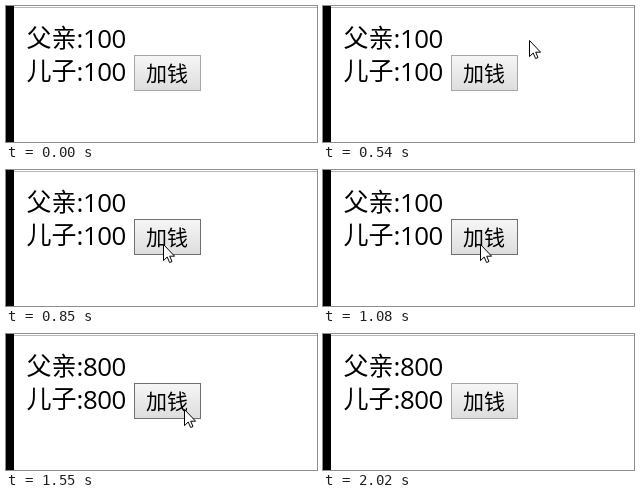
An HTML page for the animation above (2550 ms loop, 311x136 px).

```html
<!DOCTYPE html>
<html lang="zh-CN">
<head>
<meta charset="utf-8">
<title>加钱</title>
<style>
html, body { margin: 0; width: 100%; height: 100%; overflow: hidden; background: #fff; }
svg { display: block; width: 311px; height: 136px; }
text { fill: #000; font-family: "Noto Sans CJK SC", "Noto Sans CJK", sans-serif; font-size: 25px; }
.num { font-family: "Open Sans", "Noto Sans", sans-serif; font-size: 25.8px; letter-spacing: -.5px; }
.label { font-size: 21px; }
.before, .after, .hover, .cursor { animation: 2550ms step-end infinite; }
.before { animation-name: before; }
.after { animation-name: after; }
.hover { animation-name: hover; }
.cursor { animation-name: move; }

@keyframes before { 0% { opacity: 1 } 45.88%, 100% { opacity: 0 } }
@keyframes after { 0% { opacity: 0 } 45.88%, 100% { opacity: 1 } }
@keyframes hover { 0% { opacity: 0 } 27.45% { opacity: 1 } 63.92%, 100% { opacity: 0 } }

/* enter from below, curve up, come down on the button, click, leave */
@keyframes move {
  0% { transform: translate(0, 200px) }
  2.74% { transform: translate(255px, 124px) }
  5.88% { transform: translate(253px, 96px) }
  9.41% { transform: translate(247px, 71px) }
  12.54% { transform: translate(236px, 56px) }
  15.29% { transform: translate(224px, 46px) }
  18.03% { transform: translate(213px, 38px) }
  21.17% { transform: translate(206px, 34px) }
  24.31% { transform: translate(200px, 41px) }
  27.45% { transform: translate(183px, 57px) }
  30.19% { transform: translate(166px, 69px) }
  33.33% { transform: translate(157px, 74px) }
  60.78% { transform: translate(178px, 75px) }
  63.92% { transform: translate(207px, 78px) }
  67.05% { transform: translate(232px, 83px) }
  70.19% { transform: translate(256px, 94px) }
  72.94% { transform: translate(277px, 108px) }
  76.07% { transform: translate(293px, 125px) }
  79.21%, 100% { transform: translate(0, 200px) }
}
</style>
</head>
<body>
<svg viewBox="0 0 311 136">
  <defs>
    <linearGradient id="face" x2="0" y2="1">
      <stop stop-color="#f6f6f6"/><stop offset="1" stop-color="#dddddd"/>
    </linearGradient>
  </defs>
  <rect width="311" height="136" fill="#fff"/>
  <rect x="8" y="1" width="303" height="1" fill="#b6b6b6"/>
  <rect width="8" height="136" fill="#000"/>

  <text x="20.5" y="41">父亲</text>
  <text x="20.5" y="74">儿子</text>
  <text class="num" x="70.5" y="42">:</text>
  <text class="num" x="70.5" y="75">:</text>
  <g class="before">
    <text class="num" x="77" y="42">100</text>
    <text class="num" x="77" y="75">100</text>
  </g>
  <g class="after">
    <text class="num" x="77" y="42">800</text>
    <text class="num" x="77" y="75">800</text>
  </g>

  <rect x="128.5" y="49.5" width="66" height="35" fill="url(#face)" stroke="#a6a6a6"/>
  <rect class="hover" x="128.5" y="49.5" width="66" height="35" fill="url(#face)" stroke="#707070"/>
  <text class="label" x="140" y="75">加钱</text>

  <path class="cursor" d="M.5.5V16.6L4.2 13L6.6 18.5L9 17.5L6.7 12.2H11.6Z" fill="#fff" stroke="#000"/>
</svg>
</body>
</html>
```
